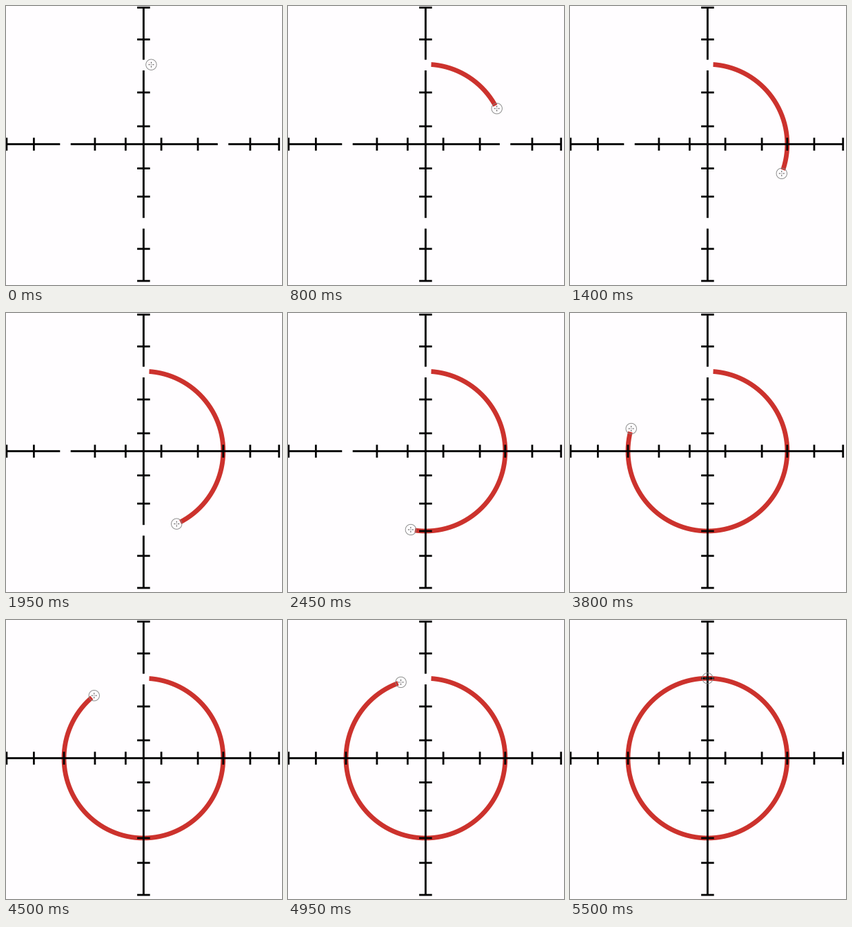
A matplotlib script for the animation above (5.55 s loop, 400x403 px).

```python
import numpy as np
import matplotlib.pyplot as plt
from matplotlib.animation import FuncAnimation

W, H, DPI = 400, 403, 64
FRAMES, STEP = 111, 50
PX = 72 / DPI                      # one pixel in points
BG, RED, INK = "#fffdff", "#cc322d", "#050505"
CX, CY, R = 199.4, 199.6, 115.4
START, LAG = 3.6, 2.6              # degrees, clockwise from the top
TICK = 9.3                         # half length of a tick

# Hand-drawn sweep: time in ms, cursor angle
SWEEP = [(0, 5.5), (600, 43), (800, 63.5), (1950, 155.5),
         (2950, 226), (3800, 286.4), (4500, 321.6), (5350, 360)]

# Each arm: direction, length, distances of its inner ticks
ARMS = [((-1, 0), 198.5, (26, 70.5, 159)),
        ((1, 0), 196.3, (25.7, 78.7, 154.5)),
        ((0, -1), 197.3, (25.8, 74.7, 151.3)),
        ((0, 1), 197.5, (35, 75.7, 151.2))]

fig = plt.figure(figsize=(W / DPI, H / DPI), dpi=DPI, facecolor=BG)
ax = fig.add_axes([0, 0, 1, 1])
ax.set(xlim=(0, W), ylim=(H, 0))
ax.axis("off")


def polar(deg, x=CX, y=CY, r=R):
    a = np.radians(deg)
    return x + r * np.sin(a), y - r * np.cos(a)


def arc(a, b, *circle):
    return polar(np.linspace(a, b, 361), *circle)


def stroke(xs, ys, color, width, z):
    line, = ax.plot(xs, ys, color=color, lw=width * PX, zorder=z,
                    solid_capstyle="butt", snap=False)
    return line


# Ring and graduated axes
stroke(*arc(0, 360), RED, 6.8, 1)
for (dx, dy), reach, inner in ARMS:
    stroke([CX, CX + dx * reach], [CY, CY + dy * reach], INK, 2.9, 2)
    for d in (*inner, R, reach):
        x, y = CX + dx * d, CY + dy * d
        tick = stroke([x - dy * TICK, x + dy * TICK],
                      [y - dx * TICK, y + dx * TICK], INK, 2.8, 2)
        if dy < 0 and d == R:
            top_tick = tick

# Blank band that the cursor wipes away
cover = stroke([], [], BG, 15.4, 3)

# Brush cursor: thin circle, four dashes and a centre dot
rim = stroke([], [], "#858585", 0.9, 4)
dashes = [stroke([], [], "#505050", 1, 4) for _ in range(4)]
dot = stroke([], [], "#505050", 1, 4)


def draw(i):
    angle = np.interp(i * STEP, *zip(*SWEEP))
    done = angle >= 360
    head = max(START, angle - LAG)
    cover.set_data(*arc(head, 360 + START, CX + 0.9, CY, R - 1.1))
    cover.set_visible(not done)
    top_tick.set_visible(done)

    x, y = polar(angle)
    rim.set_data(*arc(0, 360, x, y, 7.7))
    for k, dash in enumerate(dashes):
        dash.set_data(*polar(90 * k, x, y, np.array([1.8, 4])))
    dot.set_data([x - 0.5, x + 0.5], [y, y])
    return cover, top_tick, rim, dot, *dashes


anim = FuncAnimation(fig, draw, frames=FRAMES, interval=STEP,
                     repeat=True, repeat_delay=0, blit=False)
plt.show()
```
